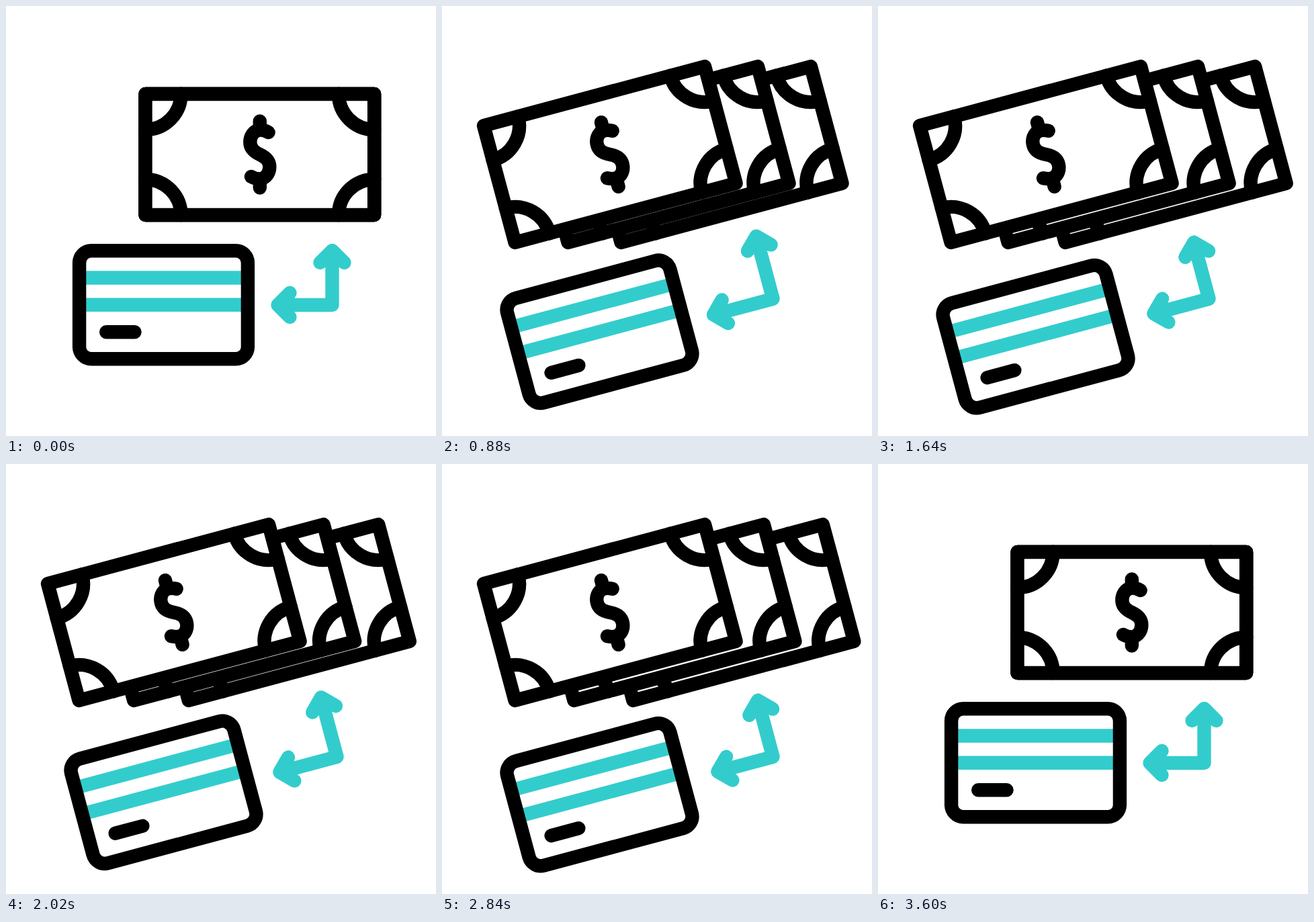
Animation, 640 px wide and 640 px high, one loop 3.62 s. Source, as an HTML page:

```html
<!DOCTYPE html>
<html lang="en">
<head>
<meta charset="utf-8">
<title>Cash and card exchange</title>
<style>
  html, body { margin: 0; width: 100%; height: 100%; overflow: hidden; background: #fff; }
  svg { display: block; width: 100vw; height: 100vh; }
  .ink { stroke: #000; }
  .accent { stroke: #3cc; }
</style>
</head>
<body>
<svg viewBox="0 0 640 640" fill="none" stroke-width="20.4" stroke-linecap="round" stroke-linejoin="round">
  <defs>
    <g id="bill" class="ink">
      <path fill="#fff" d="M-170.3 -90H170.3V90H-170.3Z"/>
      <path d="M-117.3 -90A53 53 0 0 1 -170.3 -37M117.3 -90A53 53 0 0 0 170.3 -37
               M-117.3 90A53 53 0 0 0 -170.3 37M117.3 90A53 53 0 0 1 170.3 37"/>
    </g>
  </defs>
  <g id="cash">
    <use class="back" href="#bill"/>
    <use class="back" href="#bill"/>
    <use href="#bill"/>
    <path class="ink" d="M0 -49.5V-39M0 39V49.5M12.8 -33C9 -35 4 -37 -1 -36.3C-9.5 -35 -14.5 -27 -14.5 -18.5
      C-14.5 -8 -7 -3.3 0 0C7 3.3 14.5 8 14.5 18.5C14.5 27 9.5 35 1 36.3C-4 37 -9 35 -12.8 33"/>
  </g>
  <g id="card">
    <path class="accent" stroke-linecap="butt" d="M-125 -40.3H125M-125 0H125"/>
    <rect class="ink" x="-125.4" y="-80.5" width="250.8" height="161" rx="18"/>
    <path class="ink" d="M-85.3 40.4H-43"/>
  </g>
  <path id="arrow" class="accent"/>
</svg>
<script>
const LOOP = 3620;
const $ = id => document.getElementById(id);
const backs = document.querySelectorAll('.back');

// Keyframes as [ms, value] with a smooth ease between neighbours.
const turn = [[0, 0], [600, 1], [3000, 1], [3600, 0]];
const squeeze = [[600, 0], [1200, 1], [1800, 0], [2400, 1], [3000, 0]];
const spread = [[240, 0], [600, 91.5], [1200, 63.8], [1800, 89.5], [2400, 63.8], [2970, 91.5], [3410, 0]];

function valueAt(keys, t) {
  if (t <= keys[0][0]) return keys[0][1];
  const i = keys.findIndex(key => key[0] > t);
  if (i < 0) return keys[keys.length - 1][1];
  const [t0, v0] = keys[i - 1], [t1, v1] = keys[i];
  const u = (t - t0) / (t1 - t0);
  return v0 + (v1 - v0) * u * u * (3 - 2 * u);
}

function place(el, x, y, angle = 0) {
  el.setAttribute('transform', `translate(${x} ${y}) rotate(${angle})`);
}

function draw(t) {
  const p = valueAt(turn, t), s = valueAt(squeeze, t), gap = valueAt(spread, t);
  const angle = -15 * p, tilt = Math.PI / 12;

  place($('cash'), 377.8 - 128 * p, 221, angle);
  backs.forEach((bill, i) => {
    const d = (2 - i) * gap;
    place(bill, d * Math.cos(tilt), d * Math.sin(tilt));
  });

  place($('card'), 234.5, 444.8 + 51.8 * p - 26.1 * s, angle);

  const left = -49.5 - 23.7 * s, top = -49.5 - 34 * s;
  place($('arrow'), 454, 413.5, angle);
  $('arrow').setAttribute('d',
    `M${left} 31.5H31.5V${top}m-18 18l18 -18l18 18M${left + 18} 13.5l-18 18l18 18`);
}

function frame() {
  draw(performance.now() % LOOP);
  requestAnimationFrame(frame);
}
frame();
</script>
</body>
</html>
```
